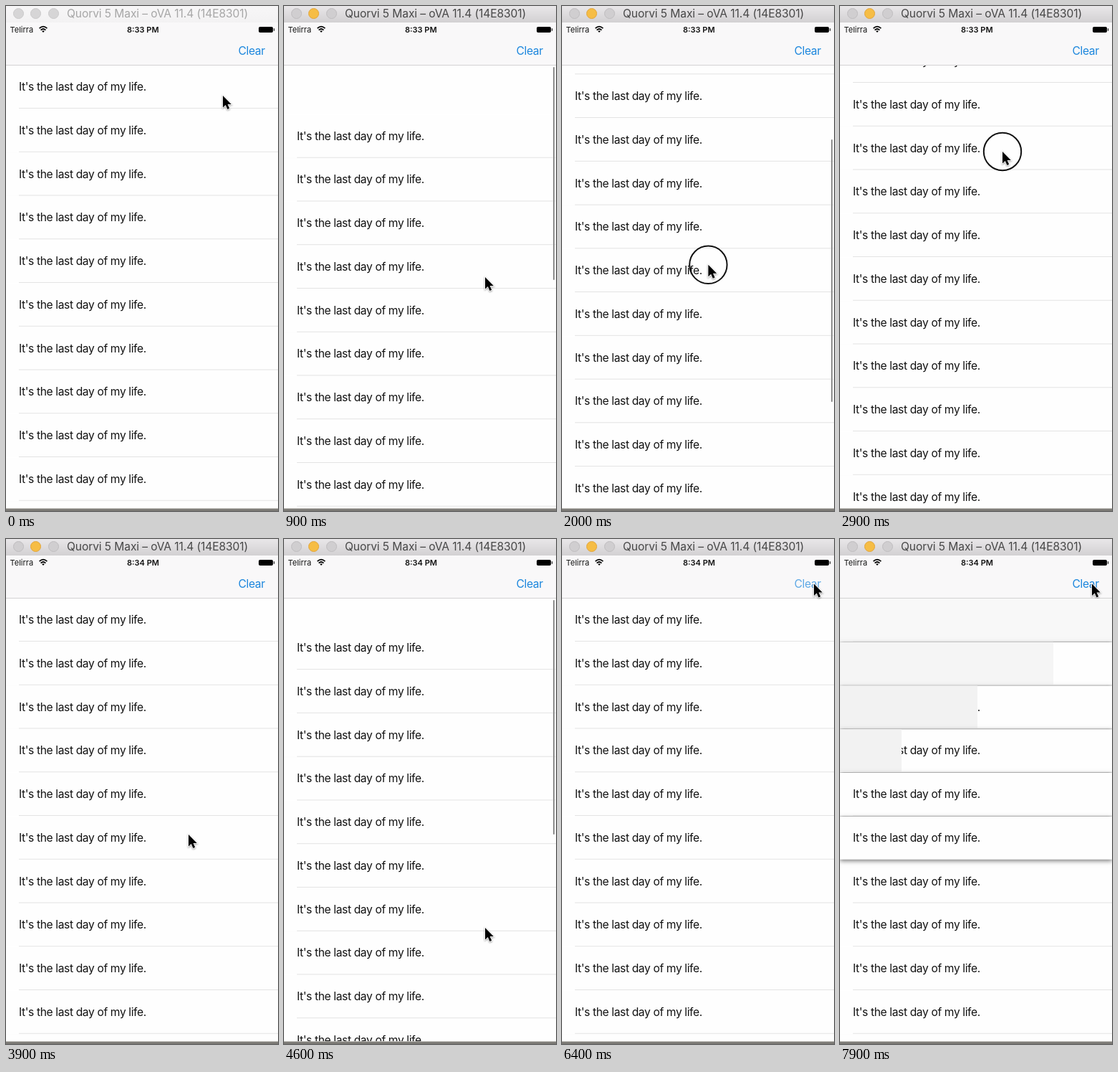
These frames come from a looping animation (380 by 704 pixels, 8 s). An HTML page:

```html
<!DOCTYPE html>
<html lang="en">
<head>
<meta charset="utf-8">
<style>
  html, body { margin: 0; width: 100%; height: 100%; overflow: hidden; }
  body { position: relative; background: #fefefe; color: #111; font-family: Inter, Roboto, sans-serif; }
  div, span, svg { position: absolute; left: 0; top: 0; box-sizing: border-box; white-space: nowrap; }
  #stage { width: 380px; height: 704px; overflow: hidden; }
  #title { width: 380px; height: 23px; background: linear-gradient(#f7f6f7, #f3f2f3); color: #a6a6a6; }
  #title.active { background: linear-gradient(#e9e7e9, #d2d0d2); color: #474747; }
  #title span { left: 85px; line-height: 21px; font-size: 15.6px; letter-spacing: -.1px; }
  #title .dot { top: 2.5px; width: 15px; height: 15px; border-radius: 50%; background: #d6d5d6; border: 1px solid #cbcacb; }
  #title.active .dot { background: #d0ced0; border-color: #bfbdbf; }
  #title.active .amber { background: #f6bd45; border-color: #e2a53a; }
  #bar { top: 23px; width: 380px; height: 60px; background: #f9f8f9; border-bottom: 1px solid #d3d2d3; }
  .status { line-height: 20px; font-size: 11px; }
  #clear { left: 324.5px; top: 29.5px; line-height: 20px; font-size: 15.6px; letter-spacing: -.37px; color: #1b86dd; }
  #battery { left: 353px; top: 5.5px; width: 20px; height: 8.5px; border-radius: 2px; background: #000; }
  #battery::after { content: ""; position: absolute; left: 20.5px; top: 2.5px; width: 1.5px; height: 3.5px; background: #000; border-radius: 0 1px 1px 0; }
  #list { top: 82.5px; width: 380px; height: 617.5px; overflow: hidden; background: #fefefe; }
  .row { width: 380px; height: 60.75px; background: #fefefe; }
  .row span { left: 18px; line-height: 60.75px; font-size: 15.6px; letter-spacing: -.37px; }
  .row .line { left: 18px; right: 0; top: auto; bottom: 0; height: 1px; background: #e3e3e3; }
  .row .wash { bottom: 1px; }
  #thumb { left: 375.5px; width: 2.5px; border-radius: 2px; background: #8e8e8e; }
  #edge { top: 700px; width: 380px; height: 4px; background: linear-gradient(#c9c7c2, #6c6a66 60%, #8d8b86); }
  #pointer { overflow: visible; }
</style>
</head>
<body>
<div id="stage">
  <div id="list"></div>
  <div id="thumb"></div>
  <div id="bar">
    <span class="status" style="left:5.5px">Telirra</span>
    <svg style="left:46px;top:4px" width="12" height="11" fill="none" stroke="#000" stroke-width="1.7">
      <path d="M.6 4.2Q6-1 11.4 4.2M2.6 6.6Q6 3.4 9.4 6.6"/><path d="M4.2 8 6 10 7.8 8Q6 6.7 4.2 8" fill="#000" stroke="none"/>
    </svg>
    <span class="status" id="clock" style="left:169px;font-weight:600"></span>
    <div id="battery"></div>
    <span id="clear">Clear</span>
  </div>
  <div id="title">
    <div class="dot" style="left:9.5px"></div><div class="dot amber" style="left:34px"></div><div class="dot" style="left:58.5px"></div>
    <span>Quorvi 5 Maxi – oVA 11.4 (14E8301)</span>
  </div>
  <div id="edge"></div>
  <svg id="pointer" width="1" height="1">
    <circle id="ring" r="26.2" fill="none" stroke="#111" stroke-width="2"/>
    <path d="M0 0V16.5L3.8 13 6.4 19 9.2 17.8 6.6 12H11.8Z" stroke="#fff" stroke-width="1.6" paint-order="stroke" style="filter:drop-shadow(0 1px 1px #0006)"/>
  </svg>
</div>
<script>
const LOOP = 8000, STEP = 100, ROW = 60.75, VIEW = 617.6, ROWS = 17;
const $ = id => document.getElementById(id);
const clamp = v => Math.max(0, Math.min(1, v));
const smooth = v => (v = clamp(v), v * v * (3 - 2 * v));

// time, x, y
const path = [
  [0, 303, 125], [100, 303, 125], [350, 295, 178], [800, 281, 378], [950, 281, 378],
  [1500, 188, 530], [1600, 188, 530], [2300, 215, 251], [2600, 215, 251], [2800, 227, 203],
  [2900, 227, 203], [3400, 240, 482], [3800, 240, 482], [4000, 270, 342], [4405, 281, 542],
  [4650, 281, 542], [5250, 320, 45], [5350, 320, 45], [5700, 364, 74], [5900, 352, 62.5], [LOOP, 352, 62.5]
];
const presses = [[350, 800], [1600, 2300], [2800, 3400], [4000, 4405], [6100, 6300]];
const scrolls = [[400, 2300], [2950, 3400], [4050, 4950]];

function pointerAt(t) {
  const i = path.findIndex(p => p[0] > t), [t0, x0, y0] = path[i - 1], [t1, x1, y1] = path[i];
  const k = smooth((t - t0) / (t1 - t0));
  return [x0 + (x1 - x0) * k, y0 + (y1 - y0) * k];
}

const dragged = (t, from) => pointerAt(t)[1] - pointerAt(from)[1];
const rubber = d => VIEW * (1 - 1 / (d * .55 / VIEW + 1));

// Overscroll while held, then a critically damped return
function pull(t, [press, release]) {
  const offset = rubber(dragged(Math.min(t, release), press));
  const b = Math.max(0, t - release) / 100;
  return offset * (1 + b) * Math.exp(-b);
}

function scrollAt(t) {
  if (t < 350) return 0;
  if (t < 1600) return pull(t, presses[0]);
  if (t < 2800) return dragged(Math.min(t, 2300), 1600);
  if (t < 4000) return dragged(2300, 1600) + dragged(Math.min(t, 3400), 2800);
  return pull(t, presses[3]);
}

const rows = Array.from({ length: ROWS }, () => {
  const row = document.createElement("div");
  row.className = "row";
  row.innerHTML = "<span>It's the last day of my life.</span><div class=wash></div><div class=line></div>";
  return $("list").appendChild(row);
});

function drawRow(row, i, t, scroll) {
  const [, wash, line] = row.children;
  const lift = clamp((t - 6450 - 250 * i) / 150);
  const width = Math.max(0, Math.min(380, .424 * (t - 6947 - 250 * i)));
  const tone = 242 + 6 * clamp((width - 190) / 190);
  row.style.transform = `translateY(${i * ROW + scroll}px)`;
  row.style.zIndex = lift ? i + 1 : 0;
  row.style.boxShadow = lift ? `0 2px 6px rgba(0,0,0,${.5 * lift})` : "none";
  line.style.opacity = 1 - .6 * lift;
  wash.style.width = width + "px";
  wash.style.background = `rgb(${tone},${tone},${tone})`;
}

function draw(t) {
  const scroll = scrollAt(t), [x, y] = pointerAt(t);
  rows.forEach((row, i) => drawRow(row, i, t, scroll));

  $("thumb").style.top = 85 + Math.max(0, -scroll) / (ROWS * ROW) * 614 + "px";
  $("thumb").style.height = 366 - Math.max(0, scroll) + "px";
  $("thumb").style.opacity = Math.max(...scrolls.map(([a, b]) => t < a ? 0 : clamp(1 - (t - b) / 250)));

  $("title").className = t >= 300 ? "active" : "";
  $("clock").textContent = t < 3800 ? "8:33 PM" : "8:34 PM";
  $("clear").style.opacity = t < 6100 ? 1 : t < 6300 ? .3 : clamp(.45 + (t - 6300) / 400);
  $("pointer").style.transform = `translate(${x}px,${y}px)`;
  $("ring").style.opacity = presses.some(([a, b]) => t >= a && t < b) ? 1 : 0;
}

function frame() {
  draw(Math.floor(performance.now() % LOOP / STEP) * STEP);
  requestAnimationFrame(frame);
}
frame();
</script>
</body>
</html>
```
